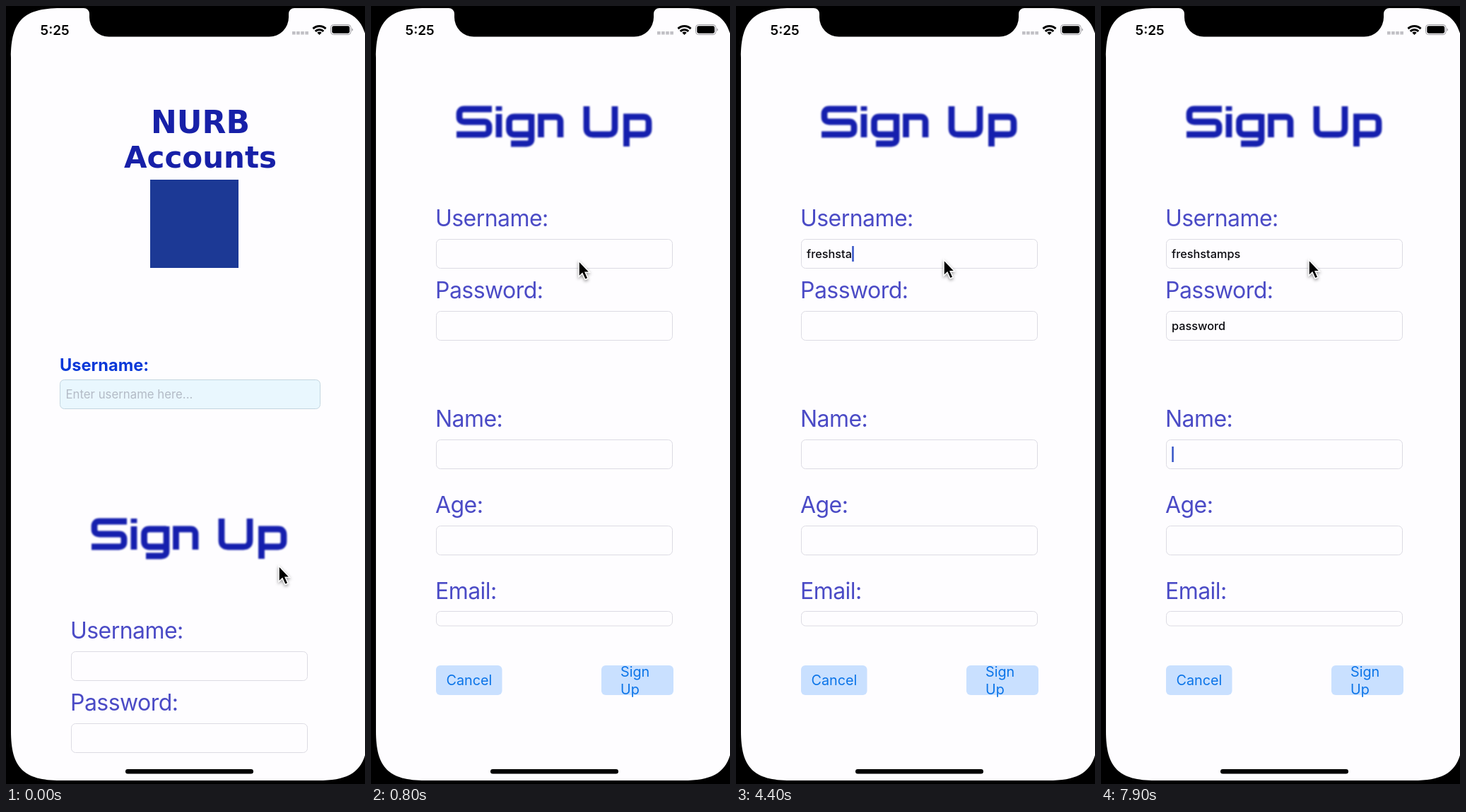
These frames come from a looping animation (508 by 1102 pixels, 8000 ms). An HTML page:

```html
<!DOCTYPE html>
<html lang="en">
<head>
<meta charset="utf-8">
<title>Sign up form</title>
<style>
  html, body { margin: 0; width: 100%; height: 100%; overflow: hidden; background: #000; }
  svg { display: block; width: 508px; height: 1102px; font-family: Inter, sans-serif; }
  .label { font-size: 32px; letter-spacing: -.55px; fill: #4b4bc6; }
  .box { fill: #fefdff; stroke: #dcdbe3; }
  .typed { font-size: 16.3px; font-weight: 450; fill: #0b0b10; }
  .button { fill: #c9e0ff; }
  .action { font-size: 19.8px; fill: #0b74e8; }
  .brand { font: bold 42px "DejaVu Sans", sans-serif; text-anchor: middle; fill: #1720a8; }
  .title { fill: none; stroke: #151fae; stroke-width: 8.8; filter: blur(1.1px); }
</style>
</head>
<body>
<svg viewBox="0 0 508 1102">
  <rect width="508" height="1102" fill="#fefdff"/>

  <g id="login">
    <text class="brand" x="275" y="180" style="font-size:44px">NURB</text>
    <text class="brand" x="275" y="229">Accounts</text>
    <rect x="204" y="246" width="125" height="125" fill="#1c3995"/>
    <text x="76" y="517" font-size="23.6" font-weight="650" fill="#0838d8">Username:</text>
    <rect x="76.5" y="529.5" width="368" height="41" rx="6" fill="#e9f7fe" stroke="#c3d5df"/>
    <text x="84.5" y="556" font-size="16.8" fill="#b3bbc6">Enter username here...</text>
  </g>

  <g id="sheet">
    <rect width="508" height="1102" fill="#fefdff"/>
    <path class="title" role="img" aria-label="Sign Up" d="
      M171 146H132q-7 0-7 7v4q0 7 7 7H160q7 0 7 7v4q0 7-7 7H121
      M181 142v6.500M181 153v33
      M227 157H203q-7.500 0-7.500 7.500V174q0 8 7.500 8H227M227 153V188q0 7-7 7H198
      M240.500 186V157H261q7 0 7 7V186
      M305 142V173q0 9 9 9H336q9 0 9-9V142
      M361.500 199V157H385q8 0 8 8v9q0 8-8 8H361.500"/>
    <g id="fields"></g>
    <rect id="caret" width="2.5" height="22" fill="#3453c6"/>
    <rect class="button" x="92" y="934" width="93.500" height="42" rx="6"/>
    <text class="action" x="106.500" y="962">Cancel</text>
    <rect class="button" x="326" y="934" width="102" height="42" rx="6"/>
    <text class="action" x="353" y="950">Sign</text>
    <text class="action" x="353" y="974.500">Up</text>
  </g>

  <path fill-rule="evenodd" d="M0 0H520V1102H0Z
    M77 3H442C494 3 512 21 512 73V1027C512 1079 494 1097 442 1097H77C25 1097 7 1079 7 1027V73C7 21 25 3 77 3Z"/>
  <path d="M110 2V3A8 8 0 0 1 118 11V16A27.500 27.500 0 0 0 145.500 43.500H372.500A27.500 27.500 0 0 0 400 16V11A8 8 0 0 1 408 3V2Z"/>

  <g id="status">
    <text x="48.500" y="41" font-size="19" font-weight="600">5:25</text>
    <path d="M405 38.300h23" stroke="#c1c0c5" stroke-width="4.500" stroke-dasharray="4.6 1.5"/>
    <g fill="none" stroke="#000" stroke-width="3">
      <path d="M434.500 32.200a13 13 0 0 1 18 0M437.700 35.800a8.400 8.400 0 0 1 11.600 0"/>
    </g>
    <path d="M443.500 41l-3.200-3.200a4.600 4.600 0 0 1 6.400 0z"/>
    <rect x="459.500" y="26.500" width="28.500" height="14" rx="4" fill="none" stroke="#99989d"/>
    <rect x="461.300" y="28.300" width="24.900" height="10.400" rx="2.400"/>
    <path d="M489.500 31.200q3 2.300 0 4.600z" fill="#99989d"/>
  </g>
  <rect x="169" y="1081" width="181" height="6.500" rx="3.250"/>

  <path id="pointer" d="M0 0V22.500L5 17.800L9 26.500L13 24.800L9.200 16.300H15.500Z"
    stroke="#fff" stroke-width="1.500" style="filter:drop-shadow(0 2px 2px #0006)"/>
</svg>

<script>
const LOOP = 8000, STEP = 100;
const $ = id => document.getElementById(id);

// name, label baseline, box top, box height
const rows = [
  ['Username:', 312, 330.5, 41],
  ['Password:', 414, 432.5, 41],
  ['Name:', 596, 614.5, 41],
  ['Age:', 718, 736.5, 41],
  ['Email:', 839.5, 857.5, 20.5]
];
$('fields').innerHTML = rows.map(([name, base, top, height]) => `
  <text class="label" x="91" y="${base}">${name}</text>
  <rect class="box" x="92.5" y="${top}" width="334" height="${height}" rx="6"/>
  <text class="typed" x="100" y="${top + 26.5}"></text>`).join('');
const typed = document.querySelectorAll('.typed');

// when each field gains focus, and when each key is pressed
const entries = [
  { focus: 1200, text: 'freshstamps', keys: [2000, 2300, 2500, 2700, 2900, 3500, 3900, 4200, 4700, 4900, 5000] },
  { focus: 5400, text: 'password', keys: [5600, 5700, 5800, 6000, 6200, 6400, 6600, 6800] },
  { focus: 7500, text: '', keys: [] }
];

const smooth = (t, from, to) => {
  const p = Math.min(1, Math.max(0, (t - from) / (to - from)));
  return p * p * (3 - 2 * p);
};

function draw(t) {
  const offset = t < 800 ? 584 * Math.exp(-t / 70.3) : 0;
  $('sheet').setAttribute('transform', `translate(0 ${offset.toFixed(2)})`);

  const move = smooth(t, 300, 800);
  const y = 793 - 432 * move - (t >= 1000 ? 1.5 : 0);
  $('pointer').setAttribute('transform', `translate(${386 - 92 * move} ${y})`);

  let active = -1, lastInput = 0;
  entries.forEach(({ focus, text, keys }, i) => {
    const count = keys.filter(k => k <= t).length;
    typed[i].textContent = text.slice(0, count);
    if (t >= focus) {
      active = i;
      lastInput = count ? keys[count - 1] : focus;
    }
  });

  const lit = active >= 0 && (t - lastInput) % 1000 < 500;
  $('caret').setAttribute('visibility', lit ? 'visible' : 'hidden');
  if (lit) {
    $('caret').setAttribute('x', 100.3 + typed[active].getComputedTextLength());
    $('caret').setAttribute('y', rows[active][2] + 9.5);
  }
}

const start = performance.now();
function tick() {
  const t = (performance.now() - start) % LOOP;
  draw(Math.floor(t / STEP) * STEP);
  requestAnimationFrame(tick);
}
tick();
</script>
</body>
</html>
```
